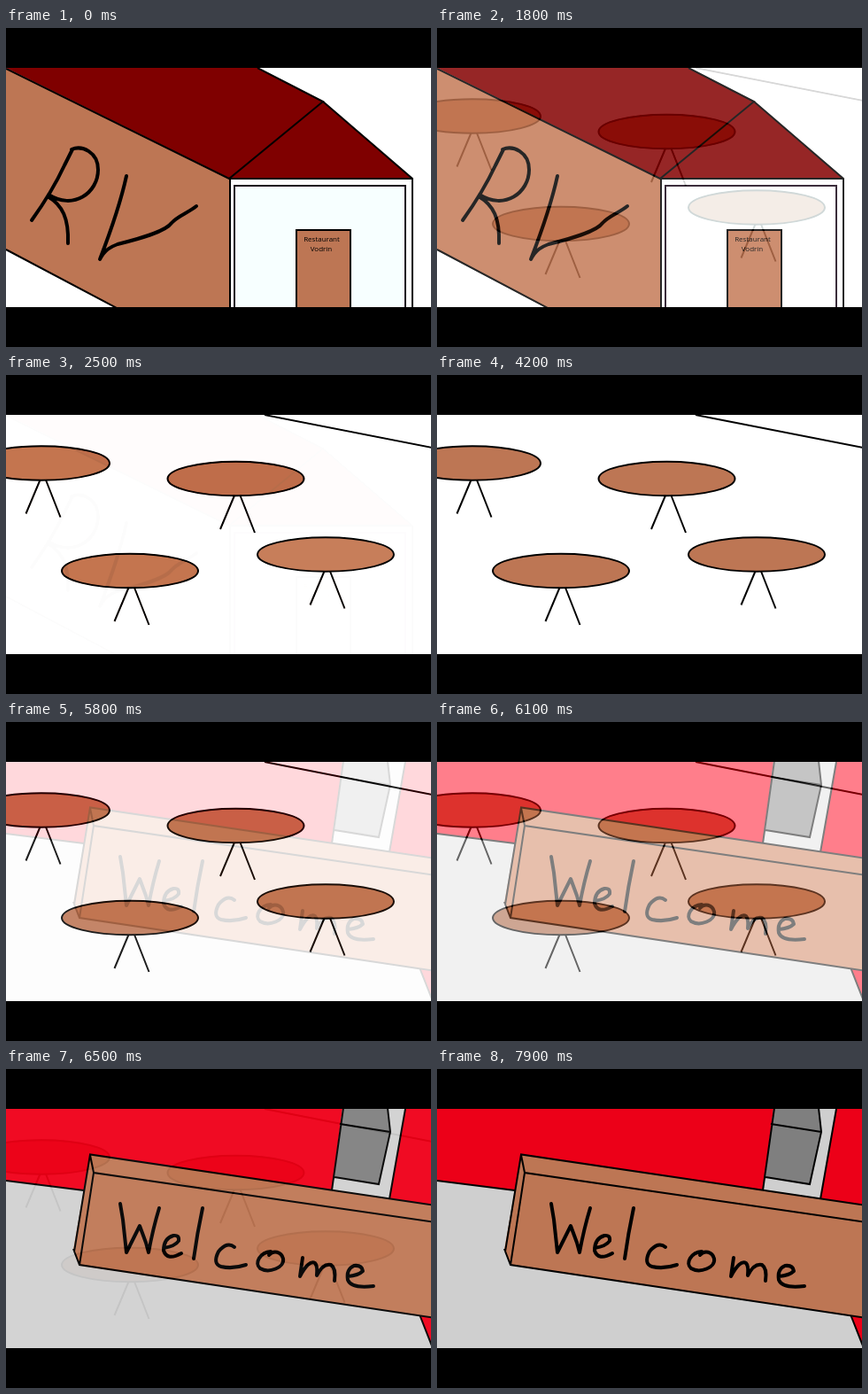
An HTML page for the animation above (8 s loop, 480x360 px).

```html
<!DOCTYPE html>
<html lang="en">
<head>
<meta charset="utf-8">
<title>Restaurant</title>
<style>
  html, body { margin: 0; width: 100%; height: 100%; overflow: hidden; background: #000; }
  #view { position: absolute; left: 0; top: 45px; width: 480px; height: 270px; overflow: hidden; background: #fff; }
  svg { display: block; }
  .ink { fill: none; stroke: #000; stroke-width: 2; }
  .hand { fill: none; stroke: #000; stroke-width: 4; stroke-linecap: round; stroke-linejoin: round; }
  .wood { fill: #bd7654; }
  .paper { fill: #fff; }
  text { font: 8px "Open Sans", "Noto Sans", sans-serif; text-anchor: middle; }
</style>
</head>
<body>
<div id="view">
  <svg id="film" width="480" height="270" viewBox="0 45 480 270">
    <g id="house">
      <rect class="paper" y="45" width="480" height="270"/>
      <path class="wood" d="M0 45L253 170V315H123L0 250Z"/>
      <path fill="#7f0000" d="M0 45H284L358 83L459 170H253Z"/>
      <path fill="#f7ffff" d="M258 178H451V315H258Z"/>
      <path class="wood" d="M328 228H389V315H328Z"/>
      <path class="ink" d="M0 46L252 170L358 83L284 45M358 83L459 170V317M252 170H459M253 170V317M0 250L125 316M328 317V228H389V317"/>
      <path class="ink" style="stroke:#180818" d="M258 317V178H451V317"/>
      <g class="hand">
        <path d="M75 137L66 155Q52 185 29 217M74 137C86 132 104 140 104 160C104 186 76 206 48 188M47 190C64 200 71 215 70 243"/>
        <path d="M136 167Q128 204 106 261C112 250 118 247 126 244C150 238 180 230 187 220C194 212 205 209 215 201"/>
      </g>
      <text x="356.5" y="241">Restaurant</text>
      <text x="356" y="252">Vodrin</text>
    </g>

    <g id="hall">
      <rect class="paper" y="45" width="480" height="270"/>
      <path class="ink" d="M292 45L481 82"/>
    </g>

    <g id="counter">
      <rect fill="#ec0018" y="45" width="480" height="270"/>
      <path fill="#cfcfcf" d="M0 126L88 137L467 277L482 315H0Z"/>
      <path fill="#cfcfcf" d="M380 45H451L433 147L368 137Z"/>
      <path fill="#7f7f7f" d="M380 45H431L434 71L421 130L371 122Z"/>
      <path class="ink" d="M0 126L88 137M467 277L482 315M451 45L433 147M381 44L368 137M431 44L434 71L421 130L371 122M377 62L434 71"/>
      <path class="wood" d="M95 96L480 153V280L83 221L76 204Z"/>
      <path class="ink" d="M482 153.500L95 96.500L77 206M76 203L83 221L482 280.500M95 97L99 117L482 172.500M99 117L83 221"/>
      <g class="hand">
        <path d="M129 152L132 170L136 207L151 177L158 196L161 207Q166 180 173 157"/>
        <path d="M178 202Q191 200 195 194Q196 187 189 188Q178 191 178 205Q182 217 198 208"/>
        <path d="M222 157Q216 185 212 214"/>
        <path d="M258 201Q250 194 240 206Q233 220 243 223Q256 226 271 221"/>
        <path d="M299 206C287 207 280 219 287 225C297 231 315 224 313 214C311 206 302 204 297 210"/>
        <path d="M335 213L332 234Q342 215 349 219Q352 222 351 233Q358 219 367 221Q373 225 371 239"/>
        <path d="M386 234Q398 233 403 228Q402 221 393 222Q384 226 386 238Q390 248 415 245"/>
      </g>
    </g>
  </svg>
</div>
<script>
  const LOOP = 8000, STEP = 100;
  const el = id => document.getElementById(id);
  const film = el('film'), hall = el('hall'), counter = el('counter');

  function table(x, y) {
    const g = document.createElementNS('http://www.w3.org/2000/svg', 'g');
    g.setAttribute('transform', `translate(${x} ${y})`);
    g.innerHTML = '<path class="ink" d="M-1.500 19L-17.500 57M5 19L21.500 61"/>' +
      '<ellipse class="ink" style="fill:#bd7654" rx="77" ry="19.300"/>';
    hall.append(g);
  }
  [[40, 99.5], [259.5, 117], [140, 221], [361, 202.5]].forEach(p => table(...p));

  // Nine even steps of a dissolve, half way at `mid`
  function mix(t, mid) {
    const k = Math.round((t - mid) / STEP);
    return k < -4 ? 0 : k > 4 ? 1 : 0.5 + k * 0.11;
  }

  const swell = p => 4 * p * (1 - p);

  function draw(now) {
    const t = Math.floor((now % LOOP) / STEP) * STEP;
    const a = mix(t, 2100), b = mix(t, 6100);
    hall.setAttribute('opacity', a);
    counter.setAttribute('opacity', b);
    // Dissolves gain a little contrast
    const lift = a < 1 ? (a < 0.5 ? swell(a) : a > 0 ? 1 : 0) : swell(b);
    film.style.filter = lift ? `contrast(${1 + 0.11 * lift})` : 'none';
  }

  const start = performance.now();
  function tick() {
    draw(performance.now() - start);
    requestAnimationFrame(tick);
  }
  tick();
</script>
</body>
</html>
```
